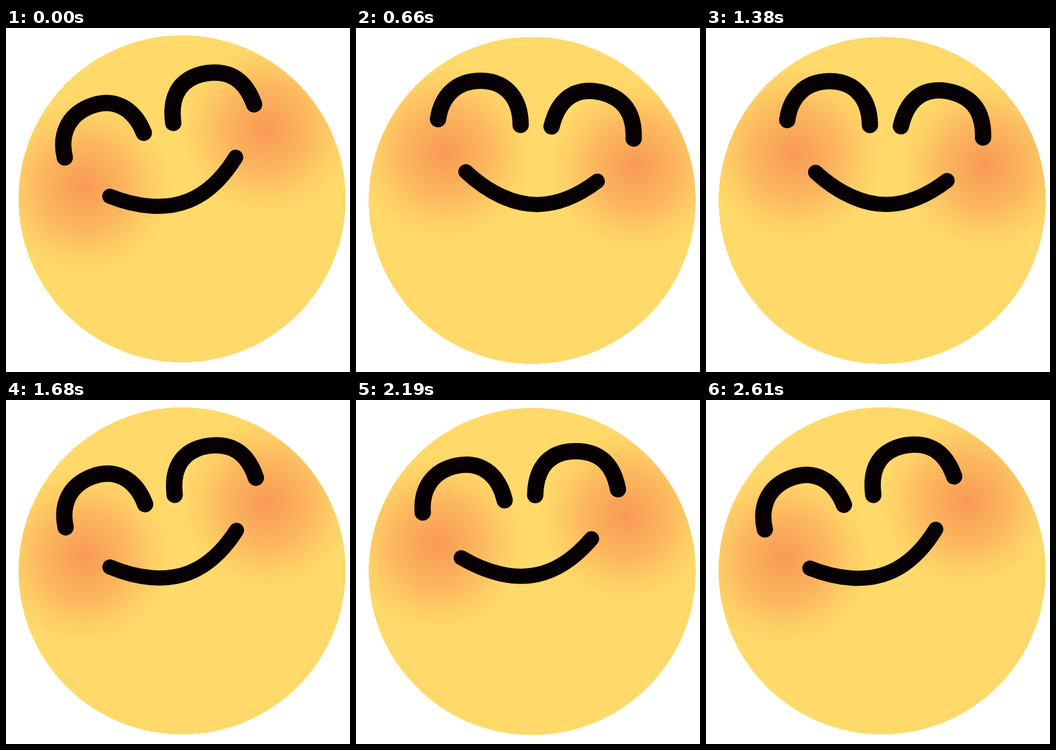
An HTML page for the animation above (2.64 s loop, 600 by 600 pixels).

```html
<!DOCTYPE html>
<html lang="en">
<head>
<meta charset="utf-8">
<title>Nodding smile</title>
<style>
  html, body { margin: 0; width: 100%; height: 100%; overflow: hidden; background: #fff; }
  svg { display: block; width: 100vw; height: 100vh; }
</style>
</head>
<body>
<svg viewBox="0 0 600 600">
  <defs>
    <radialGradient id="blush">
      <stop offset="0" stop-color="#f99955"/>
      <stop offset=".5" stop-color="#f99955" stop-opacity=".53"/>
      <stop offset=".8" stop-color="#f99955" stop-opacity=".16"/>
      <stop offset="1" stop-color="#f99955" stop-opacity="0"/>
    </radialGradient>
    <clipPath id="face"><circle cx="307.4" cy="300.8" r="285"/></clipPath>
  </defs>
  <g id="head">
    <circle cx="307.4" cy="300.8" r="285.2" fill="#ffd969" shape-rendering="crispEdges"/>
    <g clip-path="url(#face)" fill="url(#blush)">
      <circle cx="156" cy="217" r="152"/>
      <circle cx="488" cy="242" r="149"/>
    </g>
    <g fill="none" stroke="#080103" stroke-width="28.5" stroke-linecap="round">
      <path d="M144 158C150 118 176 91.5 218 91.5C262 91.5 288 122 288 169"/>
      <path d="M342 172C352 132 374 110.5 408 110.5C424 110.5 447 116 463 130C481 146 486 168 485 194"/>
      <path stroke-width="26.5" d="M192 250C230 286 274 308 316 308C352 308 386 294 421 268"/>
    </g>
  </g>
</svg>
<script>
  const FRAME = 30, BEAT = 440, DRAWN_TILT = 6.11;
  // Tilt in degrees at the start of each beat.
  const POSES = [-15.6, 10.8, 3.65, 10.8, -15.6, -6.7];
  const LOOP = BEAT * POSES.length;
  const head = document.getElementById('head');

  const easeOutSine = u => Math.sin(u * Math.PI / 2);

  function tilt(ms) {
    const beat = Math.floor(ms / BEAT);
    const from = POSES[beat], to = POSES[(beat + 1) % POSES.length];
    return from + (to - from) * easeOutSine(ms % BEAT / BEAT);
  }

  function draw() {
    const ms = Math.floor(performance.now() % LOOP / FRAME) * FRAME;
    head.setAttribute('transform', `rotate(${tilt(ms) - DRAWN_TILT} 300 300)`);
    requestAnimationFrame(draw);
  }
  draw();
</script>
</body>
</html>
```
